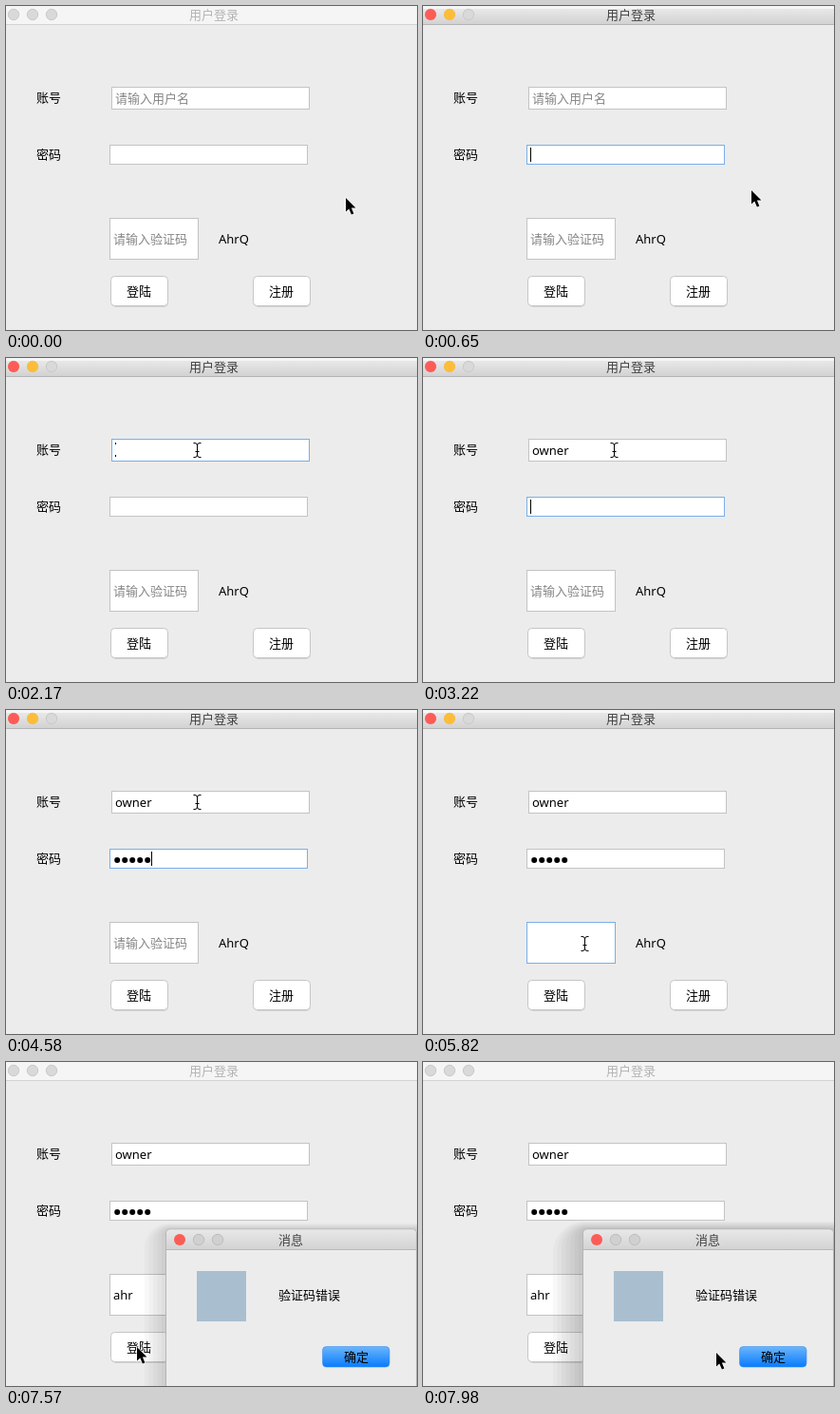
Animation of 433x341 px, one loop 8 s. Source, as an HTML page:

```html
<!DOCTYPE html>
<html lang="zh-CN">
<head>
<meta charset="utf-8">
<title>用户登录</title>
<style>
  html, body { margin: 0; width: 100%; height: 100%; overflow: hidden; background: #ececec; }
  svg { display: block; width: 433px; height: 341px; }
  text { font: 13px "Noto Sans", "Noto Sans CJK SC", "Noto Sans CJK", sans-serif; }
  .mid { text-anchor: middle; }
  .hint { fill: #868686; }
  .title { fill: #404040; }
  .field { fill: #fff; stroke: #c3c3c3; }
  .field.focus { stroke: #78aee8; }
  .button { fill: #fff; stroke: #c6c6c6; }
  .button.focus { stroke: #7db3ee; stroke-width: 2; }
  .idle { fill: #d9d9d9; stroke: #c9c9c9; }
  .halo rect { fill: #000; fill-opacity: .026; }
</style>
</head>
<body>
<svg viewBox="0 0 433 341">
  <defs>
    <linearGradient id="bar" x2="0" y2="1">
      <stop stop-color="#e8e8e8"/><stop offset="1" stop-color="#d2d2d2"/>
    </linearGradient>
    <linearGradient id="blue" x2="0" y2="1">
      <stop stop-color="#6cb5fb"/><stop offset="1" stop-color="#087bfd"/>
    </linearGradient>
  </defs>
  <rect width="433" height="341" fill="#ececec"/>

  <rect width="433" height="19" fill="#f5f5f5"/>
  <rect id="barOn" y="3" width="433" height="16" fill="url(#bar)"/>
  <rect id="barEdge" y="19" width="433" height="1"/>
  <g class="idle">
    <circle cx="8" cy="9" r="5.7"/><circle cx="28" cy="9" r="5.7"/><circle cx="48" cy="9" r="5.7"/>
  </g>
  <g id="lights">
    <circle cx="8" cy="9" r="6" fill="#fc5c56"/><circle cx="28" cy="9" r="6" fill="#fdbd38"/>
  </g>
  <text id="title" class="mid" x="219" y="14">用户登录</text>

  <text x="32" y="101">账号</text>
  <text x="32" y="161">密码</text>
  <text x="224" y="250">AhrQ</text>

  <rect id="userBox" class="field" x="111.5" y="85.5" width="208" height="23"/>
  <rect id="passBox" class="field" x="109.5" y="146.5" width="208" height="20"/>
  <rect id="codeBox" class="field" x="109.5" y="223.5" width="93" height="43"/>
  <text id="userHint" class="hint" x="115" y="102">请输入用户名</text>
  <text id="codeHint" class="hint" x="113" y="250">请输入验证码</text>
  <text id="user" x="115" y="102"></text>
  <text id="code" x="113" y="250"></text>
  <g id="dots"></g>
  <path id="caret" stroke="#000"/>

  <rect x="111" y="286" width="60" height="31" rx="5" fill="#d2d2d2"/>
  <rect id="login" class="button" x="110.5" y="284.5" width="60" height="31" rx="4"/>
  <text class="mid" x="140" y="305">登陆</text>
  <rect x="261" y="286" width="60" height="31" rx="5" fill="#d2d2d2"/>
  <rect class="button" x="260.5" y="284.5" width="60" height="31" rx="4"/>
  <text class="mid" x="290" y="305">注册</text>

  <g id="dialog">
    <g id="halo" class="halo"></g>
    <path d="M168.5 345V181q0-5 5-5H428q4.500 0 4.500 5V345Z" fill="#ececec" stroke="#b5b5b5"/>
    <path d="M169 198V181q0-4.500 4.500-4.500H428q4 0 4 4.500V198Z" fill="url(#bar)"/>
    <rect x="169" y="197" width="263" height="1" fill="#b8b8b8"/>
    <circle cx="183" cy="187" r="6" fill="#fc5c56"/>
    <g fill="#d0d0d0" stroke="#bdbdbd">
      <circle cx="203" cy="187" r="5.700"/><circle cx="223" cy="187" r="5.700"/>
    </g>
    <text class="mid title" x="300" y="192">消息</text>
    <rect x="201" y="220" width="52" height="53" fill="#a9bfd0"/>
    <text x="287" y="250">验证码错误</text>
    <rect x="333.500" y="299.500" width="70.500" height="21.500" rx="4" fill="url(#blue)" stroke="#3b8eea" stroke-width=".6"/>
    <text class="mid" x="369" y="315">确定</text>
  </g>

  <g id="arrow">
    <path d="M0 0V14.500L3.300 11.500L5.900 17.500L8.400 16.400L5.900 10.600H10.500Z" stroke="#fff" stroke-width="1.200" paint-order="stroke"/>
  </g>
  <g id="beam" fill="none" stroke="#000">
    <path d="M-3.500-7.500H-2Q.5-7.500.5-5V5Q.5 7.500-2 7.500H-3.500M4.500-7.500H3Q.5-7.500.5-5M4.500 7.500H3Q.5 7.500.5 5M-1.500 1.500H2.500"/>
  </g>
</svg>
<script>
const LOOP = 8000;
const USER = "owner", CODE = "ahr";
const userKeys = [2380, 2500, 2680, 2860, 3040];
const passKeys = [3630, 3810, 4050, 4280, 4580];
const codeKeys = [6090, 6150, 6500];
const caretOff = [[980, 1450], [2170, 2380], [5060, 5400], [5820, 6090], [6980, 7390]];
const OPEN = 7510;

// Pointer moves: start, step length, step count, end point
const home = [358, 202];
const moves = [
  [590, 57, 12, [201, 97]],
  [4640, 58, 9, [170, 246]],
  [6980, 60, 3, [138, 300]],
  [7750, 57, 4, [309, 306]],
];

const $ = id => document.getElementById(id);
const show = (id, on) => { $(id).style.display = on ? "" : "none"; };
const focus = (id, on) => $(id).classList.toggle("focus", on);
const typed = (keys, t) => keys.filter(k => k <= t).length;
const during = (t, from, to) => t >= from && t < to;
const ease = p => 1 - (1 - p ** 1.3) ** 2;

function add(parent, tag, attrs) {
  const el = document.createElementNS("http://www.w3.org/2000/svg", tag);
  for (const name in attrs) el.setAttribute(name, attrs[name]);
  return $(parent).appendChild(el);
}

const dots = passKeys.map((_, i) => add("dots", "circle", { cx: 117.2 + 8 * i, cy: 158, r: 3 }));
const halo = Array.from({ length: 7 }, (_, i) =>
  add("halo", "rect", { x: 137 + 4.5 * i, y: 168 + 1.1 * i, width: 340, height: 220, rx: 33 - 4 * i }));

function pointer(t) {
  let at = home;
  for (const [start, step, count, end] of moves) {
    if (t < start) break;
    const p = ease(Math.min(count, Math.floor((t - start) / step)) / count);
    at = at.map((v, i) => Math.round(v + (end[i] - v) * p));
  }
  return at;
}

function overField([x, y]) {
  return ["userBox", "passBox", "codeBox"].some(id => {
    const b = $(id).getBBox();
    return during(x, b.x, b.x + b.width) && during(y, b.y, b.y + b.height);
  });
}

function drawCaret(t, field) {
  const end = id => Math.round($(id).getComputedTextLength());
  const [x, y] = {
    user: [115.5 + end("user"), 89],
    pass: [113.5 + 8 * typed(passKeys, t), 149],
    code: [113.5 + end("code"), 237],
  }[field] || [0, 0];
  const hidden = caretOff.some(([from, to]) => during(t, from, to));
  // An empty field keeps the tips of its caret while it blinks
  const tips = hidden && t < 2380;
  show("caret", field && (!hidden || tips));
  $("caret").setAttribute("d", tips
    ? `M${x} ${y}v2M${x} ${y + 13}v2`
    : `M${x} ${y}v15`);
}

function render(t) {
  const active = during(t, 480, OPEN);
  show("barOn", active);
  show("lights", active);
  $("title").style.fill = active ? "#404040" : "#b3b3b3";
  $("barEdge").style.fill = active ? "#b4b4b4" : "#d3d3d3";

  const field = during(t, 1690, 3220) ? "user"
    : during(t, 480, 5400) ? "pass"
    : during(t, 5400, 7390) ? "code" : "";
  for (const id of ["user", "pass", "code"]) focus(id + "Box", id === field);
  focus("login", during(t, 7390, OPEN));

  show("userHint", t < 1690);
  show("codeHint", t < 5400);
  $("user").textContent = USER.slice(0, typed(userKeys, t));
  $("code").textContent = CODE.slice(0, typed(codeKeys, t));
  dots.forEach((dot, i) => { dot.style.display = t >= passKeys[i] ? "" : "none"; });
  drawCaret(t, field);

  show("dialog", t >= OPEN);
  const bands = t < 7570 ? 2 : t < 7630 ? 5 : 7;
  halo.forEach((band, i) => { band.style.display = i >= 7 - bands ? "" : "none"; });

  const at = pointer(t);
  const beam = overField(at);
  show("beam", beam);
  show("arrow", !beam);
  $(beam ? "beam" : "arrow").setAttribute("transform", `translate(${at})`);
}

const begin = performance.now();
function tick() {
  render((performance.now() - begin) % LOOP);
  requestAnimationFrame(tick);
}
tick();
</script>
</body>
</html>
```
